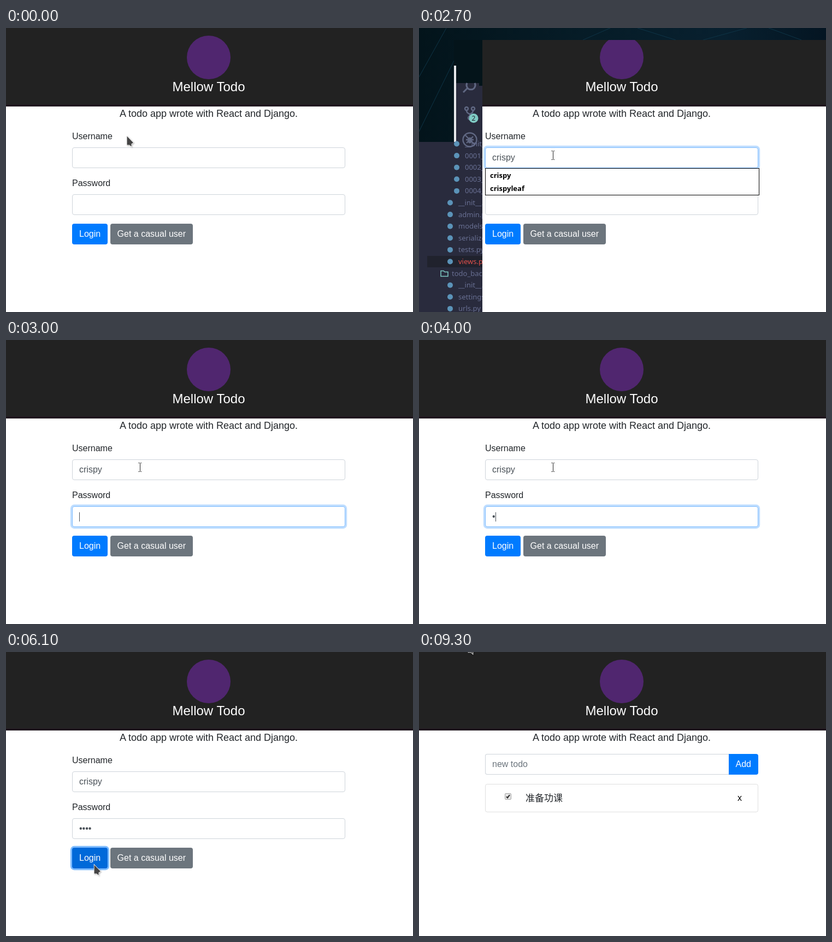
Animation, 745 px wide and 521 px high, one loop 9400 ms. Source, as an HTML page:

```html
<!DOCTYPE html>
<html lang="en">
<head>
<meta charset="utf-8">
<title>Mellow Todo</title>
<style>
* { box-sizing: border-box; }
html, body { margin: 0; width: 100%; height: 100%; overflow: hidden; background: #fff; }
body { font: 16px/24px "Liberation Sans", Arial, sans-serif; color: #212529; }
#stage { position: relative; width: 745px; height: 521px; overflow: hidden; background: #fff; }
header { position: absolute; width: 745px; height: 144px; background: #222; border-bottom: 4px solid #20181f; }
.logo { position: absolute; left: 331px; top: 14px; width: 80px; height: 80px; border-radius: 50%; background: #50266f; }
h1, .lead { position: absolute; left: 0; width: 742px; margin: 0; text-align: center; font-weight: 400; }
h1 { top: 94px; font-size: 24px; line-height: 28.8px; color: #fff; }
.lead { top: 144px; font-size: 18px; line-height: 27px; }
.view { position: absolute; left: 121px; top: 187px; width: 500px; }
.label { margin-bottom: 8px; }
.field {
  --f: 0;
  height: 38px; margin-bottom: 16px; padding: 6px 12px; border-radius: 4px; color: #495057; background: #fff;
  border: 1px solid color-mix(in srgb, #80bdff calc(var(--f) * 100%), #ced4da);
  box-shadow: 0 0 0 calc(var(--f) * 3.2px) rgba(0, 123, 255, calc(var(--f) * .25));
}
.value { position: relative; display: inline-block; height: 24px; vertical-align: top; white-space: pre; }
.caret::after { content: ""; position: absolute; left: 100%; top: 4px; width: 1px; height: 17px; background: #495057; }
.btn { --f: 0; display: inline-block; height: 38px; padding: 7px 13px; border-radius: 4px; color: #fff; background: #007bff; }
.btn.gray { background: #6c757d; }
.btn.hover { background: #0069d9; }
#login { box-shadow: 0 0 0 calc(var(--f) * 3.2px) rgba(0, 123, 255, calc(var(--f) * .5)); }
#menu {
  position: absolute; left: 0; top: 70px; width: 502px; padding-left: 8px; border: 1px solid #000;
  background: #fff; color: #000; font: bold 13px/24px "Noto Sans", "Open Sans", sans-serif;
}
.group { display: flex; margin-bottom: 17px; }
.group .field { flex: 1; margin: 0; border-right: 0; border-radius: 4px 0 0 4px; color: #6c757d; }
.group .btn { border-radius: 0 4px 4px 0; }
.item { position: relative; height: 52px; border: 1px solid rgba(0, 0, 0, .125); border-radius: 4px; }
.item > * { position: absolute; }
.item svg { left: 35px; top: 16px; }
.task { left: 73px; top: 12px; font: 17px/24px "Noto Sans CJK SC", "Noto Sans CJK", sans-serif; }
.del { left: 461px; top: 13px; color: #000; }
.layer { position: absolute; left: 0; top: 0; }
#desk { clip-path: polygon(0 0, 745px 0, 745px 22px, 116px 22px, 116px 521px, 0 521px); }
#desk text { font: 13px "Noto Sans", sans-serif; }
[hidden] { display: none !important; }
</style>
</head>
<body>
<div id="stage">
  <header></header>
  <div class="logo"></div>
  <h1>Mellow Todo</h1>
  <p class="lead">A todo app wrote with React and Django.</p>

  <div class="view" id="form">
    <div class="label">Username</div>
    <div class="field" id="user"><span class="value"></span></div>
    <div class="label">Password</div>
    <div class="field" id="pass"><span class="value"></span></div>
    <span class="btn" id="login">Login</span>
    <span class="btn gray">Get a casual user</span>
    <div id="menu"><div>crispy</div><div>crispyleaf</div><div id="third">C318K</div></div>
  </div>

  <div class="view" id="todo">
    <div class="group"><div class="field">new todo</div><span class="btn">Add</span></div>
    <div class="item">
      <svg width="13" height="13">
        <rect x=".5" y=".5" width="11" height="11" rx="1.5" fill="#e6e6e6" stroke="#a3a3a3"/>
        <path d="M3 6.2L5 8.5L9 3.2" fill="none" stroke="#333" stroke-width="2.2"/>
      </svg>
      <span class="task">准备功课</span>
      <span class="del">x</span>
    </div>
  </div>

  <svg class="layer" id="desk" width="745" height="521">
    <defs>
      <linearGradient id="night">
        <stop offset="0" stop-color="#03141b"/><stop offset=".4" stop-color="#061c27"/>
        <stop offset=".75" stop-color="#08202f"/><stop offset="1" stop-color="#041522"/>
      </linearGradient>
    </defs>
    <rect width="745" height="521" fill="url(#night)"/>
    <path d="M0 190L64 60M0 90L50 0M300 22L350 0M400 0L470 22M520 22L600 0M640 0L700 22" stroke="#0e3446" fill="none"/>
    <path d="M64 22H116V106H110V101H64Z" fill="#04141a"/>
    <path d="M68 101H110V106H116V521H0V209H68Z" fill="#292b3d"/>
    <rect x="64" y="69" width="4" height="140" fill="#e8e9ec"/>
    <rect x="15" y="418" width="101" height="21" fill="#20222d"/>
    <g fill="none" stroke="#606883" stroke-width="3">
      <path d="M88 101A8 8 0 1 0 102 101M89 110L81 118"/>
      <g stroke-width="2.4">
        <circle cx="87" cy="148" r="3"/><circle cx="99" cy="148" r="3"/><circle cx="93" cy="165" r="3"/>
        <path d="M87 151Q87 156 93 158V162M99 151Q99 156 93 158"/>
        <circle cx="93" cy="205" r="12.5"/><path d="M84 196L102 214M86 205H100M87 211L99 199"/>
      </g>
      <ellipse cx="93" cy="206" rx="4" ry="5.5" fill="#606883" stroke="none"/>
    </g>
    <circle cx="100" cy="165.500" r="8.500" fill="#7fcbc4"/>
    <text x="100" y="170" text-anchor="middle" fill="#20222d" style="font-size:12px">2</text>
    <path d="M40 455.500V445.500H45L47 447.500H53V455.500Z" fill="none" stroke="#7fcbc4" stroke-width="1.500"/>
    <g id="files"></g>
  </svg>

  <svg class="layer" width="745" height="521">
    <g id="arrow" style="filter:drop-shadow(1px 1px 1px rgba(0,0,0,.3))">
      <path d="M.5 .5V16.500H5L8.500 19.500V14.500L12 12.500Z" fill="#444" stroke="#fff" stroke-width="1.600" paint-order="stroke"/>
    </g>
    <g id="beam" fill="none">
      <path id="bar" d="M-2.500 -7.500H-.5L.5 -6.500L1.500 -7.500H3M-2.500 8.500H-.5L.5 7.500L1.500 8.500H3M.5 -6.500V7.500" stroke="#fff" stroke-width="2.500"/>
      <use href="#bar" style="stroke:#222"/>
      <path d="M-2.500 -7.500H-.5L.5 -6.500L1.500 -7.500H3M-2.500 8.500H-.5L.5 7.500L1.500 8.500H3M.5 -6.500V7.500" stroke="#222"/>
    </g>
  </svg>
</div>
<script>
const LOOP = 9400;
const $ = id => document.getElementById(id);
const NAME = 'crispy';

// Steps are [start time, value...]; each value holds until the next one.
const typed = [[0, 0], [1300, 1], [1500, 2], [1600, 3], [1700, 4], [1900, 6]];
const dots = [[0, 0], [4000, 1], [4200, 2], [4400, 3], [4600, 4]];
const userFocus = [[0, 0], [500, .5], [600, 1], [3000, 0]];
const passFocus = [[0, 0], [3000, 1], [5800, .3], [6100, 0]];
const loginFocus = [[0, 0], [5800, .6], [6100, 1]];
const userCaret = [[0, 0], [500, 1], [1000, 0], [1300, 1], [2700, 0]];
const passCaret = [[0, 0], [3000, 1], [3500, 0], [4000, 1], [5200, 0]];
const pointer = [
  [0, 'arrow', 221, 198], [100, 'arrow', 224, 203], [200, 'arrow', 231, 212],
  [300, 'beam', 240, 227], [400, 'beam', 245, 233],
  [5200, 'beam', 240, 247], [5300, 'arrow', 229, 268], [5400, 'arrow', 213, 292],
  [5600, 'arrow', 162, 391], [6100, 'arrow', 161, 390],
  [7600, 'arrow', 171, 391], [7700, 'arrow', 270, 400], [7800, 'arrow', 440, 368],
  [7900, 'arrow', 601, 303], [8000, ''],
  [8800, 'arrow', 240, 31], [8900, 'arrow', 155, 13],
  [9100, 'arrow', 130, 2], [9200, 'arrow', 108, -8], [9300, 'arrow', 90, -16]
];

const at = (steps, t) => steps.findLast(s => s[0] <= t);
const val = (steps, t) => at(steps, t)[1];
const within = (t, a, b) => t >= a && t < b;

function listFiles() {
  const names = ['__init__.py', '0001_initial.py', '0002_auto.py', '0003_auto.py', '0004_auto.py', '__init__.py',
    'admin.py', 'models.py', 'serializers.py', 'tests.py', 'views.py', 'todo_backend', '__init__.py', 'settings.py', 'urls.py'];
  $('files').innerHTML = names.map((name, i) => {
    const y = 212.5 + i * 21.6;
    const folder = name === 'todo_backend';
    const x = i < 5 ? 84 : folder ? 60 : 72;
    const color = name === 'views.py' ? '#e2504c' : '#686f92';
    const icon = folder ? '' : `<circle cx="${x - 15}" cy="${y}" r="5" fill="#5b93b8"/>`;
    return `${icon}<text x="${x}" y="${y + 4.5}" fill="${color}">${name}</text>`;
  }).join('');
}

function setField(id, text, focus, caret) {
  const field = $(id), value = field.firstChild;
  field.style.setProperty('--f', focus);
  value.textContent = text;
  value.classList.toggle('caret', caret > 0);
}

function draw() {
  const t = performance.now() % LOOP;
  setField('user', NAME.slice(0, val(typed, t)), val(userFocus, t), val(userCaret, t));
  setField('pass', '•'.repeat(val(dots, t)), val(passFocus, t), val(passCaret, t));
  $('login').style.setProperty('--f', val(loginFocus, t));
  $('login').classList.toggle('hover', t >= 5600);
  $('menu').hidden = !within(t, 1300, 3000);
  $('third').hidden = t >= 1500;
  $('form').hidden = t >= 6300;
  $('todo').hidden = t < 6300;
  $('desk').style.display = within(t, 2700, 3000) ? '' : 'none';

  const [, kind, x, y] = at(pointer, t);
  for (const id of ['arrow', 'beam']) {
    $(id).style.display = id === kind ? '' : 'none';
    if (id === kind) $(id).setAttribute('transform', `translate(${x} ${y})`);
  }
  requestAnimationFrame(draw);
}

listFiles();
draw();
</script>
</body>
</html>
```
